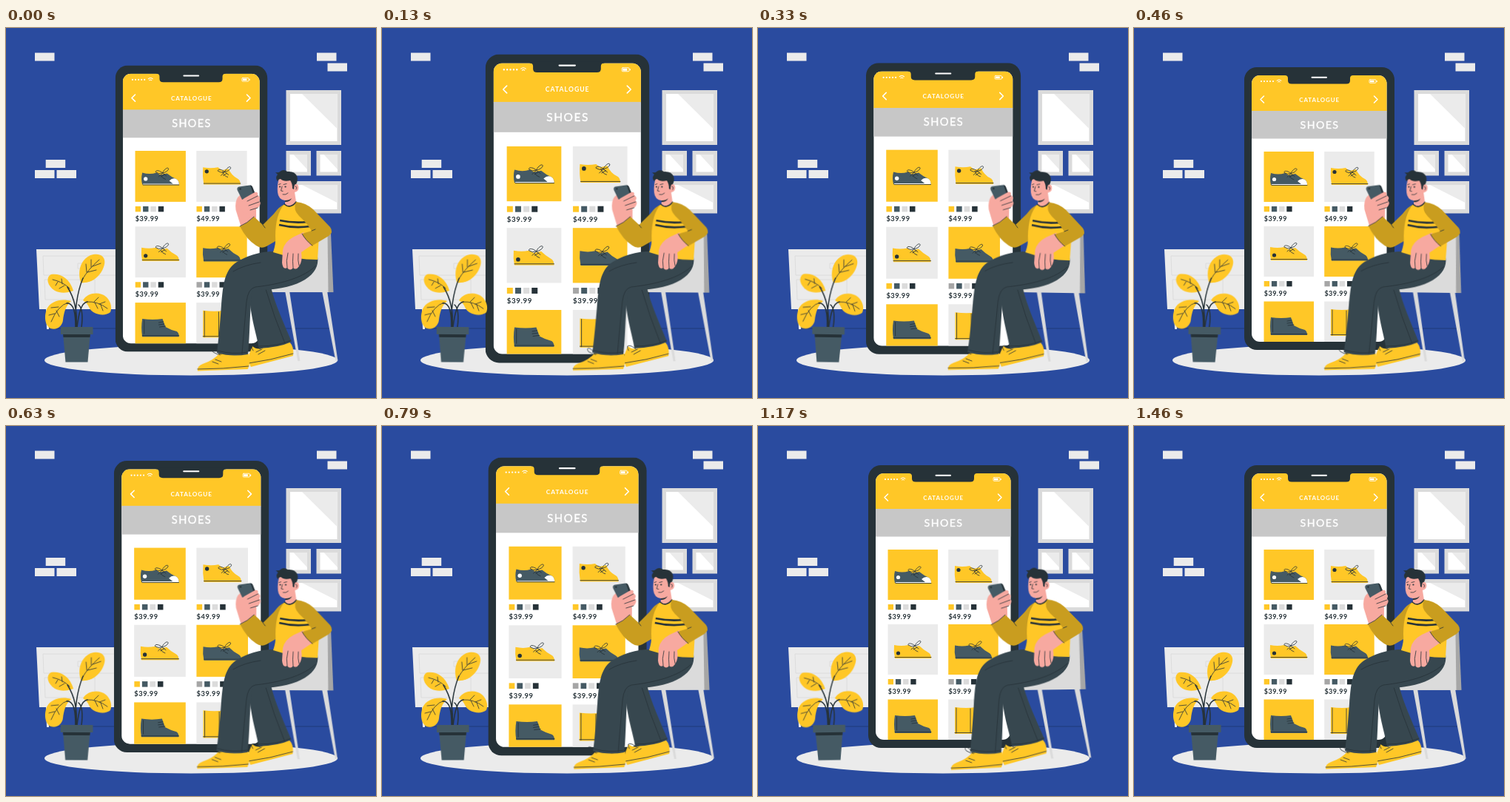
These frames come from a looping animation (500x500 px, 1.5 s). An HTML page:

```html
<!DOCTYPE html>
<html lang="en">
<head>
<meta charset="utf-8">
<title>Shoe catalogue</title>
<style>
  html, body { margin: 0; width: 100%; height: 100%; overflow: hidden; background: #2a4b9f; }
  svg { display: block; width: 100%; height: 100%; }
  text { font-family: Lato, "Open Sans", sans-serif; }
  .pulse, .wind { animation: pulse 1.5s linear -20ms infinite; }
  .pulse { transform-origin: 250.3px 244px; }
  .wind { animation-name: wind; }
  .plant { transform-origin: 97px 378px; }
  .person { transform-origin: 352px 328px; }
  @keyframes pulse {
    0%, 30%, 40%, 60%, 100% { transform: scale(1); }
    10%, 50% { transform: scale(1.092); }
  }
  @keyframes wind {
    0%, 100% { transform: rotate(0deg); }
    25% { transform: rotate(1deg); }
    75% { transform: rotate(-1deg); }
  }
  .yellow { fill: #ffc727; }
  .mustard { fill: #c99d1f; }
  .slate { fill: #455a64; }
  .trouser { fill: #37474f; }
  .dark { fill: #263238; }
  .pale { fill: #ebebeb; }
  .grey { fill: #dbdbdb; }
  .skin { fill: #f7a9a0; }
  .white { fill: #fff; }
  .line { fill: none; stroke: #263238; stroke-width: .8; stroke-linecap: round; stroke-linejoin: round; }
  .stem { stroke-width: 1.5; }
  .collar { stroke-width: 1.6; }
  .stripe { stroke-width: 2.6; stroke-linecap: butt; }
  .head { fill: #fff; text-anchor: middle; }
  .price { fill: #263238; font-size: 9px; font-weight: 700; letter-spacing: .5px; }
</style>
</head>
<body>
<svg viewBox="0 0 500 500">
  <defs>
    <clipPath id="screen"><rect x="159" y="64" width="182.5" height="360" rx="11"/></clipPath>
    <rect id="brick" class="pale" width="26.5" height="11"/>
    <rect id="tile" width="67.5" height="68"/>
    <g id="swatches">
      <rect width="7.3" height="7.3" fill="currentColor"/>
      <rect x="10.2" width="7.3" height="7.3" class="slate"/>
      <rect x="20.4" width="7.3" height="7.3" class="grey"/>
      <rect x="30.6" width="7.3" height="7.3" class="dark"/>
    </g>
    <path id="bow" class="line" d="M0 0C-4-4-10-4-9-1Q-5 2 0 0C2-5 8-9 8-5Q6-1 0 0L-5 5M0 0L5 4M-2 5L3 2"/>
    <g id="sneaker">
      <path fill="currentColor" d="M0 1Q10 3 19 1L25 4L34 2Q40 8 46 11Q50 13 50 19H1Q-1 10 0 1Z"/>
      <path class="line" d="M1 17.5H50M26 5Q28 9 32 10"/>
    </g>
    <g id="small-frame">
      <rect class="grey" width="33.5" height="33.5"/>
      <rect class="white" x="5" y="5" width="23.5" height="23.5"/>
      <path class="pale" d="M10 5H28.5V25Z"/>
    </g>
  </defs>

  <rect width="500" height="500" fill="#2a4b9f"/>

  <!-- Room -->
  <use href="#brick" x="39" y="33.5"/>
  <use href="#brick" x="420" y="33.5"/>
  <use href="#brick" x="434.5" y="47.5"/>
  <use href="#brick" x="53.7" y="178"/>
  <use href="#brick" x="39" y="192"/>
  <use href="#brick" x="68.5" y="192"/>

  <rect class="grey" x="378.5" y="84" width="74.500" height="74"/>
  <rect class="white" x="384" y="89" width="63.5" height="64"/>
  <path class="pale" d="M400 89H447.5V136Z"/>
  <use href="#small-frame" x="378.5" y="166"/>
  <use href="#small-frame" x="419.5" y="166"/>
  <rect class="grey" x="378.5" y="207" width="74.5" height="43.5"/>
  <rect class="white" x="384" y="212" width="63.5" height="33"/>
  <path class="pale" d="M400 212H447.5V236Z"/>

  <path d="M54 406H438" stroke="#1e3670" stroke-width=".8"/>
  <path class="pale" d="M41 299H200V380H45ZM54 380H60L58 407H55Z"/>
  <path d="M50 308H190V334H51ZM52 340H120V367H53ZM97 318H120V325H97ZM62 352H90" fill="none" stroke="#d8d8d8" stroke-width=".8"/>
  <ellipse class="pale" cx="250" cy="449" rx="198" ry="20.5"/>

  <!-- Big phone -->
  <g class="pulse">
    <rect class="dark" x="149" y="53" width="203" height="382" rx="17"/>
    <g clip-path="url(#screen)">
      <rect class="white" x="159" y="64" width="183" height="361"/>
      <rect class="yellow" x="159" y="64" width="183" height="49"/>
      <rect x="159" y="112" width="183" height="37.500" fill="#c7c7c7"/>

      <use href="#tile" class="yellow" x="175.5" y="167"/>
      <use href="#tile" class="pale" x="257.2" y="167"/>
      <use href="#tile" class="pale" x="175.5" y="268"/>
      <use href="#tile" class="yellow" x="257.2" y="268"/>
      <use href="#tile" class="yellow" x="175.5" y="369.5"/>
      <use href="#tile" class="pale" x="257.2" y="369.5"/>

      <path class="slate" d="M185 196Q195 199 204 196L209 199L218 197Q224 202 231 205Q234 207 234 212H185Q183 204 185 196Z"/>
      <path class="white" d="M221 207Q226 202 231 205Q234 207 234 212H186V211H226Z"/>
      <circle class="white" cx="189.5" cy="204.5" r="2.6"/>
      <path class="line" d="M186 212.500H234M210 200Q212 204 216 205"/>
      <use href="#bow" x="212" y="196.5"/>

      <path class="yellow" d="M266 189Q276 191 286 189L291 193L300 191Q304 200 312 204Q316 206 316 212H267Q265 201 266 189Z"/>
      <circle class="dark" cx="271" cy="194.5" r="2.6"/>
      <path class="line" d="M267 210.5H316M292 195Q294 201 299 202"/>
      <use href="#bow" x="295" y="195"/>

      <use href="#sneaker" x="184" y="295" color="#ffc727"/>
      <circle class="dark" cx="189.5" cy="307" r="2.6"/>
      <use href="#bow" x="212" y="297"/>
      <use href="#sneaker" x="266" y="295.500" color="#455a64"/>
      <use href="#bow" x="294" y="297.5"/>

      <path class="slate" d="M185 391Q199 393 212 391L216 402Q223 406 231 408Q234 410 234 415H185Q183 403 185 391Z"/>
      <path class="line" d="M185 413.5H234M187.500 393V411M207 396L213 395M207 399L214 398M208 402L216 401"/>
      <path class="yellow" d="M266 380Q282 382 294 380L297 400L316 409V416H266Z"/>
      <path class="line" d="M268 381V415M287 382V414M266 414.5H316"/>

      <use href="#swatches" x="175.7" y="241" color="#ffc727"/>
      <use href="#swatches" x="257.4" y="241" color="#ffc727"/>
      <use href="#swatches" x="175.7" y="342" color="#ffc727"/>
      <use href="#swatches" x="257.4" y="342" color="#a6a6a6"/>
      <text class="price" x="175.7" y="260.5">$39.99</text>
      <text class="price" x="257.4" y="260.5">$49.99</text>
      <text class="price" x="175.7" y="361.5">$39.99</text>
      <text class="price" x="257.4" y="361.5">$39.99</text>
    </g>
    <path class="dark" d="M204 62V64Q208 64 208 68V71Q208 75.5 213 75.5H287Q292 75.5 292 71V68Q292 64 296 64V62Z"/>

    <text class="head" x="250.7" y="99.6" font-size="7.9" font-weight="700" letter-spacing=".95">CATALOGUE</text>
    <text class="head" x="251" y="135.600" font-size="14.2" letter-spacing="1.4" stroke="#fff" stroke-width=".4">SHOES</text>
    <g fill="none" stroke="#fff" stroke-linecap="round" stroke-linejoin="round">
      <path stroke-width="2" d="M240.5 66.8H260"/>
      <path stroke-width="1.5" d="M175.5 92L171 96.5L175.5 101M324.5 92L329 96.5L324.5 101"/>
      <path stroke-width="2.2" stroke-dasharray="0 4" d="M172 72H189"/>
      <path stroke-width="1" d="M193 71Q196 68.5 199 71M194.5 72.8Q196 71.5 197.5 72.8"/>
      <rect x="318" y="69.7" width="9" height="4.6" rx="1" stroke-width=".8"/>
    </g>
    <path class="white" d="M319 70.7H324.5V73.3H319ZM327.5 71H328.7V73H327.5Z"/>
  </g>

  <!-- Plant -->
  <g class="wind plant">
    <g class="yellow">
      <path d="M101 344C96 328 101 313 114 307C126 303 135 308 133 319C130 334 116 346 101 344Z"/>
      <path d="M91 355C86 338 73 331 61 333C53 337 56 349 66 355C74 359 83 358 91 355Z"/>
      <path d="M88 369C75 365 60 369 55 380C51 391 53 402 60 406C69 409 76 403 77 395C78 386 80 376 88 369Z"/>
      <path d="M104 368C110 357 127 356 135 363C141 368 144 377 141 384C135 389 125 388 118 384C111 380 113 373 104 368Z"/>
    </g>
    <path class="line stem" d="M95 405C92 385 96 357 104 338M95 405C97 380 90 361 83 350M94 405C94 386 92 371 82 372M96 405C98 388 101 371 110 370M102 405C104 389 103 378 98 374"/>
    <path class="line" d="M103 340Q111 326 126 313M109 330L108 319M115 323L115 313M110 330L122 327M117 322L128 318M86 352Q77 343 63 340M76 346L75 339M70 343L67 348M79 348L72 352M84 371Q70 375 61 397M71 377L61 378M66 386L58 388M68 382L72 390M109 370Q124 369 137 379M119 370L125 364M126 373L134 370M120 371L124 379M128 374L131 382"/>
    <path class="slate" d="M77 412H114L110.5 451.5H80.5Z"/>
    <path class="dark" d="M77 413H114L113.5 418H77.5Z"/>
    <rect class="slate" x="74" y="404" width="43.5" height="10"/>
  </g>

  <!-- Man on chair -->
  <g class="wind person">
    <path class="grey" d="M377 355H383L397.5 450H394.5ZM427 355H434L448.5 449.5H445.5Z"/>
    <path class="grey" d="M420 278L436 277L438 357H356V350L400 340Z"/>
    <path fill="#a6a6a6" d="M434.5 279L439 278L442.5 357H435.500Z"/>

    <!-- Far leg -->
    <path class="yellow" d="M333 430Q340 436 348 432L383 424Q390 431 388 443L331 458Q326 449 329 440Z"/>
    <path class="line" d="M328 453Q358 449 388 440M334 436Q329 427 338 430L344 434M338 438L346 434M341 441L350 436"/>
    <path class="trouser" d="M328 350L358 350C363 372 376 400 386 424Q368 432 342 433C338 410 330 392 328 350Z"/>
    <path class="line" d="M351 353Q362 390 377 426M342 430Q368 430 385 422"/>

    <!-- Near leg -->
    <path class="yellow" d="M289 439Q308 445 328 440Q331 451 327 461L259 463.5Q258 457 266 454Q281 449 289 439Z"/>
    <path class="line" d="M259 461Q293 461 328 457M289 442C283 430 275 432 280 438Q285 442 291 441M283 448L291 451M279 451L287 454"/>
    <path class="trouser" d="M363 302C344 301 318 310 307 320C294 332 293 352 291 375C289 402 287 424 285 439Q305 445 327 441C330 413 329 383 333 352C356 357 388 350 404 340C417 332 423 321 421 309Z"/>
    <path class="line" d="M418 322C397 342 355 348 337 350Q327 352 325 370L319 440M286 436Q306 442 327 438M307 329Q322 320 344 317"/>

    <!-- Holding arm -->
    <path class="skin" d="M318 270L310.500 246Q309 235 313 229L319 223L338 230V263Z"/>
    <path class="slate" d="M312.500 219Q311.500 215 315 214.500L329 212.500Q332 212 333 215L339 230L319 232Z"/>
    <path class="dark" d="M330 212.5Q332 212 333 215L339 230L336 230Z"/>
    <circle class="dark" cx="316.5" cy="217.5" r="1.2"/>
    <path class="skin" d="M314 236L322 230L336 222Q341 221 340 226Q345 229 342 233Q346 238 340 243L330 247L322 252Z"/>
    <path class="line" d="M340 227L326 234M342 235L328 240M340 243L330 246"/>
    <path class="mustard" d="M377 238Q369 241 362 251L347 266L335 255Q326 264 316 268Q325 286 338 294Q345 299 352 295L371 284Z"/>
    <path class="line" d="M347 266L350 270M335 255Q326 264 316 268"/>

    <!-- Torso -->
    <path class="yellow" d="M376 238Q384 245 392 235L403 239L423 280L421 313Q391 313 361 303Q365 291 364 281Q364 252 376 238Z"/>
    <path class="line stripe" d="M370 260Q389 264 407 262M369 266Q389 271 411 268"/>

    <!-- Head -->
    <path class="skin" d="M369 203Q366 212 367 222Q368 232 377 233L377 239Q384 245 392 235L390 222Q397 220 395 213Q393 209 389 212L386 201Z"/>
    <path class="dark" d="M367 207Q363 202 367 198L364 195Q369 196 370 194Q375 190 380 194Q390 193 393 200Q395 205 392 211Q389 210 389 218L387 217Q387 210 384 206Q375 208 371 204Q368 204 367 207Z"/>
    <path class="line" d="M375 211.5L379 210.5M368.5 211.5L371 210.5M373 214L371.5 220L374 220.5M374 225Q378 226 381 223M391 214Q394 214 392 218"/>
    <circle class="dark" cx="377.5" cy="214.5" r="1.1"/>
    <circle class="dark" cx="370" cy="214.5" r="1"/>
    <path class="dark" d="M377 233Q383 233 386 230Q384 235 377 235Z"/>
    <path class="line collar" d="M376 238Q384 245 392 235"/>

    <!-- Resting arm -->
    <path class="skin" d="M402 276L415 292L399 303Q401 315 396 322Q392 328 388 324Q384 329 380 324Q374 327 373 317L374 300Q376 289 389 282Z"/>
    <path class="line" d="M381 304Q378 315 380 324M388 305Q387 316 388 324M395 305Q394 314 396 321"/>
    <path class="mustard" d="M392 235Q405 236 415 245L438 269Q443 276 436 281L414 294Q405 287 400 278L413 274Q406 263 396 254Q387 245 392 235Z"/>
    <path class="line" d="M413 274L418 272M414 294Q405 287 400 278"/>
  </g>
</svg>
</body>
</html>
```
